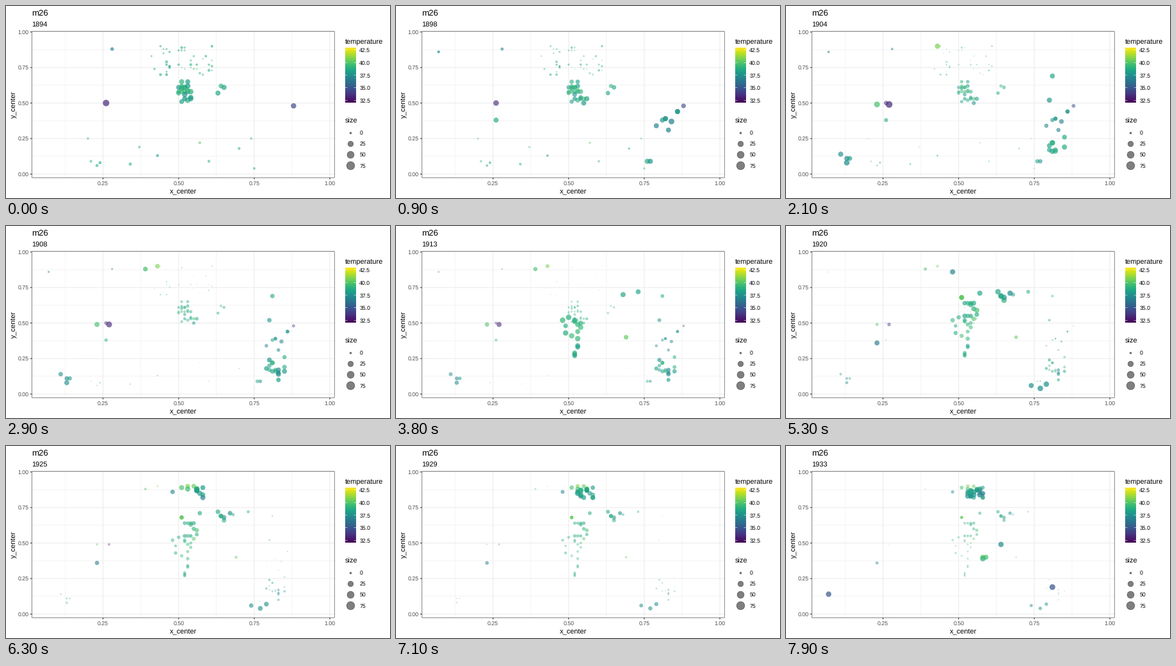
These frames come from a looping animation (600x300 px, 8000 ms). A matplotlib script:

```python
import numpy as np
import matplotlib.pyplot as plt
from matplotlib.animation import FuncAnimation
from matplotlib.patches import Rectangle

W, H, FRAMES, STEP = 600, 300, 80, 100
PT = 0.72                      # points per pixel at 100 dpi
LIFE = 62                      # frames a point needs to fade away
LEFT, RIGHT, TOP, BOTTOM = 40.5, 513.2, 39.7, 268.2
T_LOW, T_HIGH = 32.05, 42.95
DARK, GRID = "#333333", "#ebebeb"

plt.rcParams["font.family"] = "Liberation Sans"
plt.rcParams["text.hinting"] = "none"
rng = np.random.default_rng(26)
cmap = plt.get_cmap("viridis")

fig = plt.figure(figsize=(W / 100, H / 100), dpi=100, facecolor="white")
ax = fig.add_axes([0, 0, 1, 1])
ax.axis("off")


def px(x):
    return 33.5 + 472.5 * np.asarray(x)


def py(y):
    return 262.6 - 222 * np.asarray(y)


def line(xs, ys, color, width, z=1):
    ax.plot(xs, ys, color=color, lw=width * PT, zorder=z,
            solid_capstyle="butt", snap=False)


def text(x, y, s, size, color="black", **kw):
    return ax.text(x, y, s, fontsize=size * PT, color=color, zorder=6, **kw)


def area(r):
    return (2 * np.asarray(r) * PT) ** 2


# ---- panel ----
def draw_panel():
    for v in np.arange(0.125, 1, 0.25):
        line([px(v)] * 2, [TOP, BOTTOM], GRID, 0.55)
        line([LEFT, RIGHT], [py(v)] * 2, GRID, 0.55)
    for v in np.arange(0, 1.01, 0.25):
        line([LEFT, RIGHT], [py(v)] * 2, GRID, 1.07)
        line([LEFT - 2.75, LEFT], [py(v)] * 2, DARK, 1.07)
        text(35.6, py(v) + 3.2, f"{v:.2f}", 8.8, "#4d4d4d", ha="right")
        if v > 0:
            line([px(v)] * 2, [TOP, BOTTOM], GRID, 1.07)
            line([px(v)] * 2, [BOTTOM, BOTTOM + 2.75], DARK, 1.07)
            text(px(v), 279.6, f"{v:.2f}", 8.8, "#4d4d4d", ha="center")
    ax.add_patch(Rectangle((LEFT, TOP), RIGHT - LEFT, BOTTOM - TOP, fill=False,
                           ec=DARK, lw=0.6 * PT, zorder=5, snap=False))
    text(40.5, 15, "m26", 13.2)
    text(277, 293, "x_center", 11, ha="center")
    text(11.5, 154, "y_center", 11, rotation=90, ha="center", va="center")


# ---- legends ----
def draw_legends():
    text(529.5, 59, "temperature", 11)
    x0, x1, y0, y1 = 530, 547, 65, 151
    ax.imshow(np.linspace(1, 0, 256)[:, None], cmap=cmap, aspect="auto",
              extent=(x0, x1, y1, y0), interpolation="bilinear", zorder=2)
    for t in np.arange(32.5, 43, 2.5):
        y = y1 - (t - T_LOW) / (T_HIGH - T_LOW) * (y1 - y0)
        line([x0, x0 + 3.4], [y, y], "white", 0.55, 3)
        line([x1 - 3.4, x1], [y, y], "white", 0.55, 3)
        text(552.2, y + 3.5, f"{t:.1f}", 8.8)
    text(529.5, 183, "size", 11)
    for i, s in enumerate((0, 25, 50, 75)):
        y = 197.6 + 17.28 * i
        ax.scatter(538.4, y, s=area(1.42 + 5.33 * np.sqrt(s / 88)),
                   c=[(0, 0, 0, 0.5)], linewidths=0.7 * PT, zorder=3,
                   snap=False)
        text(552.2, y + 3.2, str(s), 8.8)


# ---- points: each appears once, then shrinks and fades ----
points = []


def spot(born, x, y, temp=38.5, r=4.1):
    points.append((x, y, r, temp, round(born)))


def cloud(start, end, n, x, y, dx, dy, temp=38.6, r=4.0):
    """A stay around (x, y): n sightings on a 0.01 grid."""
    for born in np.linspace(start, end, n):
        spot(born, round(x + rng.uniform(-dx, dx), 2),
             round(y + rng.uniform(-dy, dy), 2),
             temp + rng.normal(0, 0.6), r + rng.uniform(-0.3, 0.3))


def add_start():
    cloud(-42, -14, 40, 0.51, 0.80, 0.11, 0.10, r=2.5)
    cloud(-32, -14, 12, 0.43, 0.15, 0.32, 0.12, r=2.8)
    cloud(-8, 0, 22, 0.52, 0.58, 0.02, 0.07)
    cloud(-8, -4, 3, 0.64, 0.59, 0.02, 0.04)
    spot(-6, 0.28, 0.88, 37, 2.8)
    spot(-2, 0.26, 0.50, 33.3, 5)
    spot(-2, 0.88, 0.48, 34.5)


def add_east():
    cloud(1, 4, 3, 0.55, 0.51, 0.03, 0.03)
    cloud(4, 9, 8, 0.83, 0.37, 0.04, 0.07, 37.8)
    cloud(4, 6, 2, 0.765, 0.11, 0.01, 0.04, 37.3)
    cloud(11, 19, 9, 0.82, 0.21, 0.03, 0.09)
    cloud(14, 20, 4, 0.15, 0.09, 0.04, 0.05, 37.5)
    spot(2, 0.26, 0.38)
    spot(3, 0.07, 0.86, 37, 2.1)
    spot(15, 0.81, 0.69)
    spot(16, 0.80, 0.52, 37.8)
    spot(18, 0.43, 0.90, 40.8)
    spot(20, 0.23, 0.49, 39.8, 4.4)
    spot(21, 0.27, 0.49, 33.3, 5)


def add_middle():
    cloud(24, 28, 7, 0.82, 0.17, 0.04, 0.08, 37.8, 3.7)
    cloud(31, 37, 12, 0.51, 0.47, 0.03, 0.08, 39)
    cloud(33, 37, 5, 0.525, 0.31, 0.01, 0.04, r=3.8)
    cloud(40, 48, 12, 0.54, 0.58, 0.02, 0.07)
    cloud(45, 47, 3, 0.515, 0.68, 0.008, 0.004, 40.2)
    cloud(49, 53, 6, 0.65, 0.69, 0.02, 0.04, 38.3)
    cloud(51, 53, 3, 0.765, 0.055, 0.03, 0.02, 37.5)
    spot(29, 0.39, 0.88, 39.8, 3.5)
    spot(31, 0.73, 0.72)
    spot(32, 0.69, 0.40, 40.3, 3.7)
    spot(33, 0.68, 0.70)
    spot(47, 0.23, 0.36, 36.6)
    spot(48, 0.57, 0.71)
    spot(50, 0.48, 0.86, 37)


def add_north():
    cloud(55, 60, 6, 0.53, 0.89, 0.03, 0.015, 40.2)
    cloud(57, 63, 8, 0.57, 0.86, 0.015, 0.04, 38.2)
    cloud(65, 79, 17, 0.56, 0.85, 0.028, 0.035, 38.2)
    cloud(75, 77, 3, 0.585, 0.395, 0.005, 0.005, 39.5)
    spot(77, 0.64, 0.49, 37.2)
    spot(78, 0.07, 0.14, 35)
    spot(79, 0.81, 0.19, 35, 4.3)


draw_panel()
draw_legends()
add_start()
add_east()
add_middle()
add_north()
ax.set_xlim(0, W)
ax.set_ylim(H, 0)

points.sort(key=lambda p: p[4])
X, Y, R, T, BORN = np.array(points, float).T
colors = cmap((T - T_LOW) / (T_HIGH - T_LOW))
dots = ax.scatter(px(X), py(Y), s=area(R), c=colors, linewidths=0.3 * PT,
                  zorder=4, snap=False)
year = text(40.5, 32, "", 11)


def update(i):
    age = i - BORN
    left = np.where(age < 0, 0, np.clip(1 - age / LIFE, 0, 1))
    radius = np.where(left > 0, 0.35 + (R - 0.35) * left, 0)
    rgba = colors.copy()
    rgba[:, 3] = 0.72 * left ** 0.7
    dots.set_sizes(area(radius))
    dots.set_facecolors(rgba)
    dots.set_edgecolors(rgba)
    year.set_text(str(1894 + i // 2))
    return dots, year


anim = FuncAnimation(fig, update, frames=FRAMES, interval=STEP,
                     repeat=True, repeat_delay=0, blit=False)
plt.show()
```
